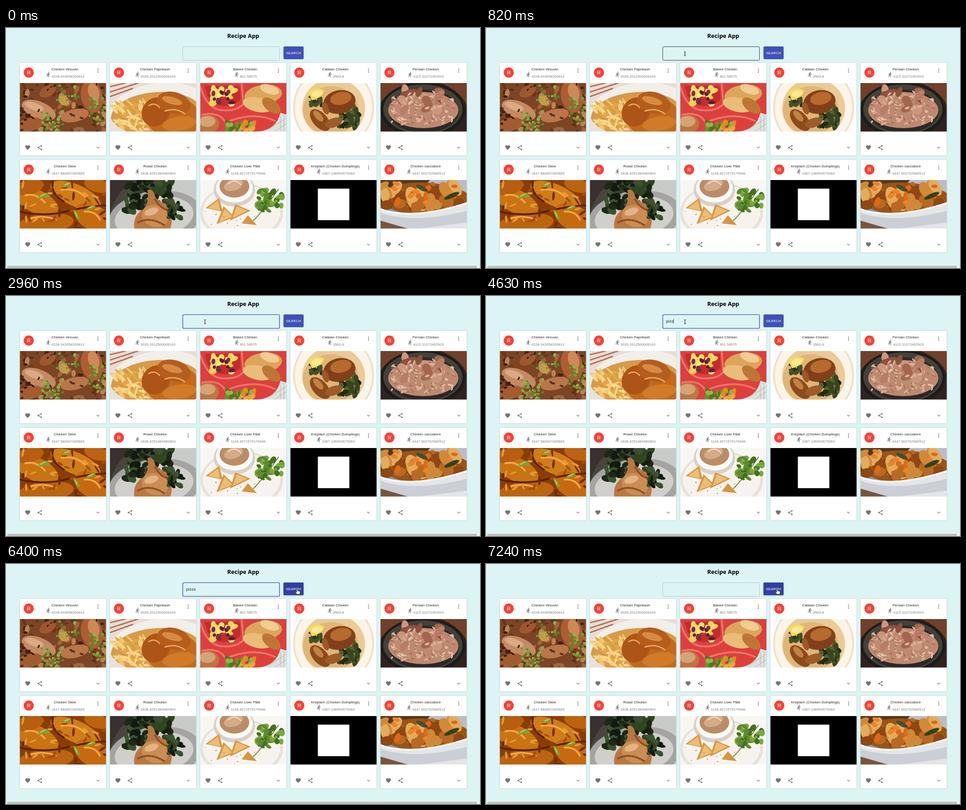
An HTML page for the animation above (8000 ms loop, 1053 px wide and 532 px high).

```html
<!DOCTYPE html>
<html lang="en">
<head>
<meta charset="utf-8">
<title>Recipe App</title>
<style>
html, body { margin: 0; width: 100%; height: 100%; overflow: hidden; background: #ddf4f4; }
#stage { display: block; width: 100vw; height: 100vh; font-family: "Liberation Sans", Arial, sans-serif; }
.heading { font: bold 12.9px "Noto Sans", "Open Sans", sans-serif; text-anchor: middle; }
.card { fill: #fff; filter: drop-shadow(0 .7px .8px rgba(0,0,0,.28)); }
.name, .count { font-size: 7.84px; letter-spacing: .01071em; }
.name { fill: #212121; text-anchor: middle; }
.count { fill: #7c7c7c; }
.initial { font-size: 11.2px; fill: #fff; text-anchor: middle; }
.icon { fill: #757575; }
.label { font-size: 7.84px; letter-spacing: .02857em; fill: #fff; }
.query { font-size: 9px; letter-spacing: .00938em; fill: #222; }
</style>
</head>
<body>
<svg id="stage" viewBox="0 0 1053 532">
  <defs>
    <filter id="soft" x="0" y="0" width="1" height="1"><feGaussianBlur stdDeviation=".7"/></filter>
    <clipPath id="buttonClip"><rect x="616.6" y="41" width="44.4" height="28" rx="2.2"/></clipPath>
    <g id="heart"><path d="M12 21.35l-1.45-1.32C5.4 15.36 2 12.28 2 8.5 2 5.42 4.42 3 7.5 3c1.74 0 3.41.81 4.5 2.09C13.09 3.81 14.76 3 16.5 3 19.58 3 22 5.42 22 8.5c0 3.78-3.4 6.86-8.55 11.54z"/></g>
    <g id="share"><path d="M18 5L6 12l12 7" fill="none" stroke="#757575" stroke-width="2"/><circle cx="18" cy="5" r="3"/><circle cx="6" cy="12" r="3"/><circle cx="18" cy="19" r="3"/></g>
    <g id="expand"><path d="M16.59 8.59L12 13.17 7.41 8.59 6 10l6 6 6-6z"/></g>
    <g id="more"><circle cx="12" cy="6" r="2"/><circle cx="12" cy="12" r="2"/><circle cx="12" cy="18" r="2"/></g>
    <g id="run"><path d="M13.49 5.48c1.1 0 2-.9 2-2s-.9-2-2-2-2 .9-2 2 .9 2 2 2zm-3.6 13.9l1-4.4 2.1 2v6h2v-7.5l-2.1-2 .6-3c1.3 1.5 3.3 2.5 5.5 2.5v-2c-1.9 0-3.5-1-4.3-2.4l-1-1.6c-.4-.6-1-1-1.7-1-.3 0-.5.1-.8.1l-5.2 2.2v4.7h2v-3.4l1.8-.7-1.6 8.1-4.9-1-.4 2 7 1.4z"/></g>
  </defs>
  <rect width="1053" height="532" fill="#ddf4f4"/>
  <text class="heading" x="527" y="22">Recipe App</text>

  <rect id="field" x="392.6" y="41.4" width="215" height="30.2" rx="2.2" fill="none"/>
  <text id="query" class="query" x="400" y="59.4"></text>
  <rect id="caret" y="51" width=".9" height="10" fill="#222"/>

  <rect id="button" x="616.6" y="41" width="44.4" height="28" rx="2.2" fill="#3f51b5"/>
  <rect id="hover" x="616.6" y="41" width="44.4" height="28" rx="2.2" fill="#303f9f"/>
  <text class="label" x="622" y="57.8">SEARCH</text>
  <g clip-path="url(#buttonClip)"><circle id="ripple" cx="647" cy="54.5" fill="#fff"/></g>

  <g id="cards"></g>
  <rect y="527" width="1053" height="5" fill="#f1f1f1"/>
  <rect x="3" y="527" width="1043" height="5" fill="#c1c1c1"/>

  <g id="pointer">
    <path id="arrow" d="M0 0v10.2l2.4-2.2 1.6 3.6 1.6-.7-1.6-3.5h3.2z" fill="#fff" stroke="#222" stroke-width=".7"/>
    <path id="ibeam" d="M-2.2-4.5h1.5q.7 0 .7.7v7.6q0 .7-.7.7h-1.5M2.2-4.5H.7Q0-4.5 0-3.8v7.6q0 .7.7.7h1.5" fill="none" stroke="#333" stroke-width=".9"/>
    <path id="hand" d="M-1.1 1Q0-.8 1.1 1v4l4.2 1q1.3.4 1.2 2L5.5 12.5H-.7L-3.7 8q-.7-1.5.6-1.6L-1.1 8z" fill="#fff" stroke="#222" stroke-width=".8"/>
  </g>
</svg>
<script>
const $ = id => document.getElementById(id);
const clamp = v => Math.max(0, Math.min(1, v));

// Shape helpers for the dishes, in a 191.5 x 107.5 box
const fill = c => `<rect width="192" height="108" fill="${c}"/>`;
const oval = (x, y, rx, ry, c, turn = 0) =>
  `<ellipse cx="${x}" cy="${y}" rx="${rx}" ry="${ry}" fill="${c}" transform="rotate(${turn} ${x} ${y})"/>`;
const shape = (c, d) => `<path fill="${c}" d="${d}"/>`;
const line = (c, w, d) => `<path fill="none" stroke="${c}" stroke-width="${w}" stroke-linecap="round" d="${d}"/>`;

function scatter(seed, n, [x, y, w, h], [rx, ry], colors) {
  const rnd = () => (seed = (seed * 16807) % 2147483647) / 2147483647;
  rnd(); rnd();
  let out = '';
  for (let i = 0; i < n; i++) {
    out += oval(x + rnd() * w, y + rnd() * h, rx * (.7 + rnd() * .6), ry * (.7 + rnd() * .6),
      colors[i % colors.length], rnd() * 180);
  }
  return out;
}

const peas = ['#759b38', '#5d8428', '#8eb04d'];
const leaves = ['#1d2916', '#2f4522', '#121a10', '#3c5230'];

const dishes = {
  vesuvio: () => fill('#7c4525') +
    scatter(11, 60, [0, 0, 192, 108], [9, 5], ['#4b2412', '#a1663c', '#6a3518', '#b98350']) +
    oval(42, 60, 40, 19, '#c68a63', 22) + oval(32, 52, 22, 8, '#dba983', 20) +
    oval(62, 18, 20, 12, '#9e5830', -30) + oval(160, 30, 24, 36, '#ac5e32', -14) +
    oval(164, 20, 12, 20, '#cc8a59', -18) + oval(122, 72, 32, 14, '#b97648', -12) +
    oval(22, 92, 30, 15, '#a35c31', -12) + oval(98, 39, 13, 10, '#c99a46', 30) +
    scatter(5, 36, [48, 62, 50, 45], [3, 3], peas) + scatter(9, 28, [154, 26, 37, 64], [3, 3], peas) +
    scatter(21, 18, [80, 4, 50, 34], [2.8, 2.8], peas) +
    scatter(4, 26, [0, 0, 192, 108], [4, 2], ['#321a10', '#55301b']),

  paprikash: () => fill('#e9ddd2') +
    line('#b5715c', 3, 'M0 8L34 0M0 20L62 0M0 30L50 12') +
    oval(108, 62, 112, 62, '#f2eeea', -8) + oval(104, 72, 102, 52, '#d79a49', -4) +
    scatter(15, 60, [10, 44, 70, 60], [12, 2.6], ['#f0c66d', '#e2a846', '#f6d88c']) +
    oval(140, 76, 62, 46, '#c16a1c', 8) + oval(102, 64, 30, 34, '#ad5418', 42) +
    oval(142, 44, 38, 24, '#b55d1c', 16) + oval(138, 39, 23, 8, '#d98a42', 16) +
    oval(154, 90, 38, 16, '#d17a28', -8) + line('#e8a45c', 3, 'M86 50q14-8 24 4M122 62q24-8 44 6') +
    shape('#e6e2de', 'M0 76Q14 100 40 108H0z'),

  baked: () => fill('#dc403d') +
    shape('#dfe2dd', 'M192 70V108H126Q170 104 178 66z') +
    line('#a9b8ae', 1, 'M150 104L192 78M164 108L192 90M178 72v36M186 70v38') +
    line('#f2736a', 4, 'M0 8Q14 54 44 60Q82 64 96 46L92 0M4 70Q56 60 62 108M60 86Q120 62 166 84') +
    shape('#c42c30', 'M10 6H88L90 36Q72 56 42 50Q18 48 10 6z') +
    scatter(8, 22, [26, 10, 54, 36], [8, 6], ['#f4dd6c', '#efd158', '#fae996']) +
    scatter(19, 11, [22, 14, 50, 32], [5, 5], ['#5b1d27', '#77313b']) +
    oval(140, 26, 42, 22, '#dba65c', -8) + oval(128, 48, 34, 16, '#e8bd78', 12) +
    oval(154, 14, 22, 10, '#f0cd90', 18) + oval(158, 50, 24, 13, '#bd7635', 38) +
    oval(18, 90, 24, 20, '#ba7744', 8) + oval(16, 85, 18, 12, '#d7a274') +
    scatter(31, 42, [58, 86, 60, 22], [5, 4], ['#6a922d', '#4e7821', '#94b54c']) +
    scatter(7, 8, [92, 82, 34, 24], [6, 4], ['#e48b22', '#f1a63a']),

  catalan: () => fill('#fdfcfa') +
    oval(96, 54, 90, 92, '#f1dfc7') + oval(96, 54, 86, 88, '#fbf4e8') + oval(96, 56, 70, 66, '#eacb96') +
    oval(90, 61, 62, 54, '#dfb677') + oval(66, 82, 29, 16, '#8d4a1d', 48) +
    scatter(13, 34, [110, 44, 42, 52], [9, 5], ['#394521', '#202a14', '#58622e']) +
    scatter(17, 16, [46, 28, 28, 24], [7, 4], ['#44502a', '#27331a']) +
    oval(109, 42, 36, 26, '#82401a', -12) + oval(112, 34, 24, 14, '#b76a2d', -12) +
    oval(78, 56, 14, 7, '#9d5827', 70) + oval(62, 73, 15, 7, '#c28240', 48) +
    shape('#f5d95e', 'M39 20Q60 6 76 17Q66 36 48 38z') + oval(59, 24, 12, 7, '#f9e991', -14) +
    oval(96, 88, 20, 10, '#9d5c2a', -20),

  persian: () => fill('#30231e') +
    shape('#70402a', 'M0 0H60Q16 18 0 44zM192 0H134Q178 18 192 50z') +
    oval(94, 60, 94, 62, '#1c1d1b') + oval(94, 58, 88, 55, '#444139') + oval(96, 62, 78, 48, '#2b2926') +
    oval(95, 60, 78, 40, '#bd8970') +
    scatter(3, 150, [24, 30, 140, 62], [4, 1.7], ['#dfb398', '#c99479', '#e8c4ab', '#ab735b']) +
    scatter(29, 16, [46, 16, 88, 44], [13, 9], ['#b87d66', '#a4654d', '#ca967e', '#8e513d']) +
    scatter(41, 12, [52, 18, 82, 42], [5, 2], ['#ddb29d']),

  stew: () => fill('#8a3d08') +
    oval(38, 48, 52, 26, '#c97312', 26) + oval(124, 34, 60, 24, '#d07d18', 24) +
    oval(58, 96, 62, 22, '#bd6410', -6) + oval(164, 84, 46, 28, '#c56a10', 28) +
    oval(20, 16, 34, 16, '#b75f0e', -14) + oval(172, 12, 30, 15, '#bd630d', 16) +
    line('#efaa46', 4, 'M12 34q24-6 44 16M92 22q32-6 54 16M22 86q30-10 58 2M144 70q24-2 34 18') +
    line('#5b2104', 4, 'M0 70Q54 82 102 70T192 56M74 4q-8 24 24 44') +
    scatter(23, 34, [0, 0, 192, 108], [8, 2.5], ['#e59a34', '#a34d09', '#712c05']) +
    line('#7da337', 6, 'M45 39l14-8M50 34l14 2M98 13l12-5M122 70l8 14M151 64l14-6') +
    line('#bfd46b', 2, 'M45 36l11-5M100 11l9-4M123 72l4 9M153 62l9-4'),

  roast: () => fill('#4a443f') +
    shape('#c9cbc9', 'M122 0H192V108H92z') + oval(100, 82, 104, 58, '#a5a4a0', -8) +
    oval(98, 82, 88, 46, '#d0cfca', -8) + shape('#38312d', 'M0 0H56Q8 28 0 80z') +
    scatter(37, 95, [36, 2, 104, 68], [11, 6], leaves) +
    shape('#b97842', 'M83 22Q96 18 101 38Q108 48 124 53Q144 76 134 108H54Q50 78 75 64Q88 48 83 22z') +
    oval(100, 80, 30, 24, '#ca8d54', 18) + oval(92, 70, 16, 8, '#e2b380', -18) +
    line('#8d5128', 4, 'M100 42q12 22 28 24M62 94q28-14 58 6') +
    scatter(12, 16, [130, 54, 30, 30], [8, 4], leaves),

  pate: () => fill('#f8f6f3') +
    oval(92, 72, 92, 64, '#e8e2da') + oval(92, 70, 86, 58, '#f6f3ee') +
    oval(76, 22, 46, 37, '#d9d0c7') + oval(76, 18, 41, 32, '#fbf9f5') + oval(76, 14, 33, 25, '#bb8c68') +
    oval(74, 11, 22, 12, '#d4aa87', -18) + line('#f1d3b7', 3, 'M62 8q16-12 28 2') +
    shape('#d89543', 'M12 62L42 40L50 70zM36 98L52 58L76 82zM66 90L78 54L112 68zM92 96L106 78L126 100z') +
    shape('#efbd73', 'M17 62L40 45L44 67zM42 94L54 64L71 81zM72 84L81 58L105 68z') +
    line('#688b31', 2, 'M118 90Q144 64 174 20M144 60L128 40M154 48L178 56') +
    scatter(43, 34, [126, 22, 60, 46], [8, 5], ['#5f8c2c', '#79a93c', '#44701f']) +
    scatter(10, 14, [16, 70, 118, 34], [1.2, 1.2], ['#aa8a59']),

  dumplings: () => fill('#000') + '<rect x="61" y="19" width="70" height="70" fill="#fff"/>',

  cacciatore: () => fill('#8f939a') +
    shape('#b9bdc3', 'M96 0H192V54L100 30z') + shape('#56371f', 'M0 0H110L76 36L0 54z') +
    oval(104, 44, 104, 38, '#9a5417', 4) +
    scatter(27, 42, [0, 14, 170, 48], [17, 10], ['#cf8939', '#b66a24', '#e3ab5b', '#8f4715']) +
    scatter(6, 13, [24, 4, 142, 48], [8, 5], ['#dc6a19', '#eb832a']) +
    oval(158, 35, 18, 5, '#32411d', -24) + oval(92, 18, 14, 5, '#43512a', 28) +
    shape('#e4e5e8', 'M0 64Q66 88 192 50V108H0z') + shape('#cbced4', 'M0 73Q76 98 192 68V94L84 108H0z') +
    line('#f7f7f8', 4, 'M0 65Q72 90 192 51') + shape('#77553d', 'M0 90L62 108H0z')
};

const recipes = [
  ['Chicken Vesuvio', '4228.043058200812', 'vesuvio'],
  ['Chicken Paprikash', '3033.2012500008163', 'paprikash'],
  ['Baked Chicken', '901.58575', 'baked'],
  ['Catalan Chicken', '3900.8', 'catalan'],
  ['Persian Chicken', '4115.31372402923', 'persian'],
  ['Chicken Stew', '1647.980907065869', 'stew'],
  ['Roast Chicken', '2638.8251983480804', 'roast'],
  ['Chicken Liver Pâté', '1149.3071579176606', 'pate'],
  ['Kreplach (Chicken Dumplings)', '4387.196994575062', 'dumplings'],
  ['Chicken cacciatore', '4447.802702966512', 'cacciatore']
];

const icon = (id, x, y) =>
  `<use href="#${id}" class="icon" transform="translate(${x - 6.7} ${y - 6.7}) scale(.56)"/>`;

function card([name, count, dish], i) {
  const x = 30.7 + (i % 5) * 200.35, y = 77 + Math.floor(i / 5) * 215;
  const soft = dish === 'dumplings' ? '' : 'filter="url(#soft)"';
  const width = 7.84 * (.556 * (count.length - 1) + .278) + .084 * count.length;
  const left = 100.2 - (width + 13.4) / 2;
  return `<g transform="translate(${x} ${y})">
    <rect class="card" width="191.5" height="205.6" rx="2.2"/>
    <circle cx="19.8" cy="21.8" r="11.2" fill="#f44336"/>
    <text class="initial" x="19.8" y="25.8">R</text>
    <text class="name" x="100" y="16.9">${name}</text>
    ${icon('run', left + 6.7, 26.2)}
    <text class="count" x="${left + 13.4}" y="33">${count}</text>
    ${icon('more', 173.6, 17.5)}
    <svg y="45" width="191.5" height="107.4"><g ${soft}>${dishes[dish]()}</g></svg>
    ${icon('heart', 17.5, 188)}${icon('share', 44.3, 188)}${icon('expand', 173.6, 188)}
  </g>`;
}
$('cards').innerHTML = recipes.map(card).join('');

// Pointer path: time, x, y
const path = [
  [140, 982, 414], [276, 850, 296], [412, 690, 140], [548, 540, 56], [684, 462, 43], [820, 442, 57],
  [5570, 442, 57], [5640, 462, 58], [5780, 545, 62], [5920, 632, 64], [5990, 645, 62.5],
  [6200, 646, 60], [6340, 645, 57], [6400, 647, 54.5]
];
const carets = [[1370, 1880, 400], [2410, 2960, 400], [4630, 5160, 416.2], [5160, 5690, 421.2]];

function pointerAt(t) {
  const last = path[path.length - 1];
  if (t >= last[0]) return last.slice(1);
  const i = path.findIndex(k => k[0] > t);
  const [a, b] = [path[i - 1], path[i]];
  const f = (t - a[0]) / (b[0] - a[0]);
  return [a[1] + (b[1] - a[1]) * f, a[2] + (b[2] - a[2]) * f];
}

function sampled(t) {
  const [from, step] = t < 5570 ? [140, 68] : [5570, 70];
  return t >= 6340 ? (t < 6400 ? 6340 : 6400) : from + Math.floor((t - from) / step) * step;
}

const within = (x, y, l, t, r, b) => x > l && x < r && y > t && y < b;
const show = (id, on) => $(id).setAttribute('visibility', on ? 'visible' : 'hidden');
const set = (id, attrs) => { for (const k in attrs) $(id).setAttribute(k, attrs[k]); };

function render(t) {
  const visible = t >= 140;
  const [x, y] = visible ? pointerAt(sampled(t)) : [0, 0];
  const onField = visible && within(x, y, 392, 41, 608, 72);
  const onButton = visible && within(x, y, 616, 41, 661, 69);
  set('pointer', { transform: `translate(${x} ${y})` });
  show('ibeam', onField);
  show('hand', onButton);
  show('arrow', visible && !onField && !onButton);

  const focused = t >= 1370 && t < 6550;
  set('field', {
    stroke: focused ? '#3f51b5' : onField ? '#1d2020' : '#aabbbb',
    'stroke-width': focused ? (t < 1420 ? 1 : 1.4) : onField ? .9 : .8
  });
  $('query').textContent = t < 4630 || t >= 6880 ? '' : t < 5160 ? 'pizz' : 'pizza';
  const caret = carets.find(c => t >= c[0] && t < c[1]);
  show('caret', caret);
  if (caret) set('caret', { x: caret[2] });

  set('hover', { opacity: clamp((t - 6040) / 250) });
  const lift = clamp((t - 6040) / 250) + (t >= 6550 && t < 6880 ? .6 : 0);
  $('button').style.filter = `drop-shadow(0 ${.8 + lift * .6}px ${.9 + lift * .7}px rgba(0,0,0,.35))`;

  const grow = clamp((t - 6550) / 550);
  set('ripple', { r: t < 6550 ? 0 : 4 + 40 * grow * (1 - grow * .4), opacity: .25 * (1 - clamp((t - 6860) / 360)) });
}

const start = performance.now();
function frame() {
  render((performance.now() - start) % 8000);
  requestAnimationFrame(frame);
}
frame();
</script>
</body>
</html>
```
